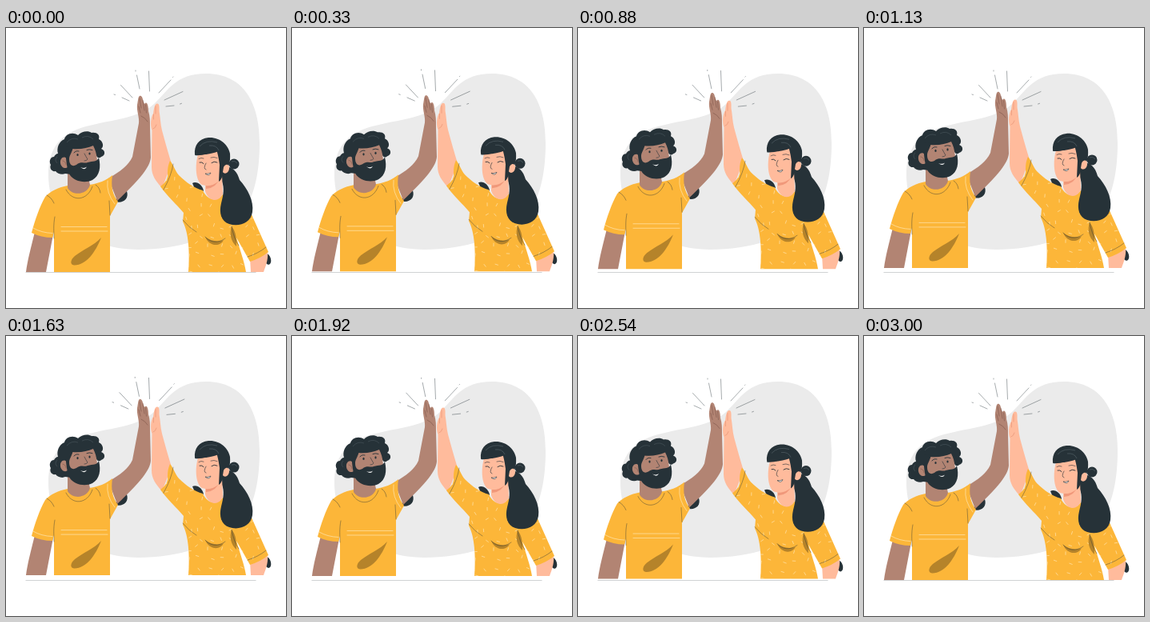
An HTML page for the animation above (3040 ms loop, 350 by 350 pixels).

```html
<!DOCTYPE html>
<html lang="en">
<head>
<meta charset="utf-8">
<title>High five</title>
<style>
  html, body { margin: 0; width: 100%; height: 100%; overflow: hidden; background: #fff; }
  svg { display: block; width: 100vw; height: 100vh; }
  .ink { fill: #263238; }
  .shirt { fill: #fcb639; }
  .tan { fill: #b28473; }
  .peach { fill: #ffbb9c; }
  .fold { fill: #b5832a; }
  .line { fill: none; stroke: #263238; stroke-width: .6; stroke-linecap: round; stroke-linejoin: round; }
  .thick { stroke-width: .9; }
  .soft { stroke-opacity: .75; stroke-width: .55; }
  .pale { fill: none; stroke: #fff0cf; stroke-width: .7; stroke-opacity: .8; stroke-linecap: round; }
  .shade { fill: none; stroke: #7f574b; stroke-width: .6; stroke-linecap: round; }
</style>
</head>
<body>
<svg viewBox="0 0 350 350">
  <defs>
    <path id="top" d="M205 166 C209 170 211 178 216 184 C225 193 235 200 246 203 C251 214 262 219 271 208 C286 211 300 219 306 231 L328 280 Q318 288 305 292 L288 262 C292 276 298 292 300 305 H228 C230 280 228 255 221 242 L222 231 C213 220 202 211 193 198 Q204 190 202 181 Q202 172 205 166Z"/>
    <clipPath id="topClip"><use href="#top"/></clipPath>
  </defs>

  <path fill="#ebebeb" d="M53 183 C53 150 68 132 100 123 C135 114 165 113 185 95 C203 78 212 57 250 57 C298 57 317 95 317 143 C317 180 311 213 292 236 C262 262 215 277 165 277 C110 276 53 250 53 183Z"/>

  <g id="rays" class="line soft">
    <path d="M143.500 71.500 L158 87 M145 87 L154 91 M135 83 L136.500 83.500 M162 53 V54 M163.500 59 L167 76 M178.500 54 L179.500 79 M208.500 61.500 L209 61 M206 65 L191 81 M221 79.500 L198 90 M200 98 L210 97 M217.500 95 L219.500 94.300"/>
  </g>

  <g id="people">
    <!-- man -->
    <path class="ink" d="M136 217 C147 220 154 213 151 204 L143 203Z"/>
    <path class="tan" d="M36 255 C31 275 27 290 25 305 H50 L59 258Z"/>
    <path class="tan" d="M128 188 C143 179 153 172 158 161 L166 119 C167 112 163 103 164 96 C165 92 165 86 167 85 C169 84 171 87 171 90 L173 95 C176 91 178 96 178 104 C180 110 180 116 180 123 L181 162 C180 173 169 188 139 216Z"/>
    <path class="shade" d="M167 88 L169 100 M171 90 L173 103 M166 98 L168 106 M174.500 96 L175.500 106 M169 110 Q174 112 177 117"/>
    <path class="shirt" d="M77 197 C66 199 55 204 49 211 C42 223 36 241 32 256 Q44 262 58 262 L60 255 V305 H130 V235 L140 217 C133 208 131 198 133 184 C126 190 115 195 103 196Z"/>
    <path class="tan" d="M77 178 L77 200 C84 211 102 208 105 196 L102 183Z"/>
    <path class="line soft" d="M75 202 C83 218 102 216 108 198 M51 209 Q57 212 60 219 M61 236 C59 247 60 254 60 263 M112 196 Q117 199 118 206 M129 216 L130 234"/>
    <path class="pale" d="M69 248.500 H126 M69 254 H127 M34 250 Q44 256 58 256.500 M127 191 Q125 206 136 220"/>
    <path class="fold" d="M119 262 C110 272 96 277 86 285 C80 290 80 296 85 296.500 C100 297 112 280 119 262Z"/>

    <path class="ink" d="M74 182 C70 184 64 182 62 179 C57 180 54 175 56 171 C53 166 56 161 60 161 C61 159 63 157 65 157 C63 150 66 142 73 139 C74 133 83 129 90 134 C94 129 103 128 107 131 C113 130 118 133 116 139 C121 141 123 148 119 151 C125 153 124 160 119 161 C116 164 113 161 112 158 L82 183Z"/>
    <path class="tan" d="M77 165 C78 160 80 156 83 151 C93 152 102 150 109 147 C114 156 116 172 112 182 C101 191 84 187 78 177Z"/>
    <path class="tan" d="M76 163 C72 159 67 163 68 169 C69 175 75 177 78 173Z"/>
    <path class="shade" d="M71 166 Q75 167 75 171"/>
    <path class="ink" d="M75 148 L84 149 C82 157 79 159 79 164 C79 171 83 174 88 171 C94 166 99 170 102 168 C109 166 113 168 116 162 C119 174 117 185 108 190 C98 195 85 191 80 184 C77 179 76 172 75 163Z"/>
    <path fill="#fff" d="M93 174 Q98 176 101 173.500 Q98.500 178.500 93 174Z"/>
    <ellipse class="ink" cx="89.500" cy="158.500" rx="1.1" ry="1.6"/>
    <ellipse class="ink" cx="104.500" cy="157" rx="1.1" ry="1.6"/>
    <path class="line thick" d="M85 156 Q87 153 91 154 M101 152.500 Q104 151 108 152.500"/>
    <path class="line" d="M98 157 Q100 161 102 164 Q101 166 98 166"/>
    <path fill="none" stroke="#55636a" stroke-width=".45" d="M76 143 Q82 136 90 139 M95 137 Q103 133 109 139 M64 161 Q60 165 64 169"/>

    <!-- woman -->
    <path class="ink" d="M233 194 C238 191 246 196 247 204 L236 201Z"/>
    <ellipse class="ink" cx="327" cy="289" rx="4" ry="7" transform="rotate(-15 327 289)"/>
    <path class="peach" d="M305 288 L327 281 C328 290 324 299 322 305 H306Z"/>
    <path class="peach" d="M195 200 C187 191 182 184 182 174 L182.500 128 C180 122 181 111 184 107 C185 100 186 94.500 189 94.500 C192 94.500 191.500 99 191.500 104 C193 112 193 120 195 128 C199 143 203 157 207 170Z"/>
    <path fill="none" stroke="#dc8468" stroke-width=".5" stroke-linecap="round" d="M187 98 L187 107 M184.500 108 L184.500 114 M184 126 Q187 125 188 121"/>
    <use class="shirt" href="#top"/>
    <g id="flecks" class="pale" clip-path="url(#topClip)"></g>
    <path class="fold" d="M249 261 C255 266 265 268 272 265 C267 275 253 272 249 261Z M282 248 C288 255 288 264 288 273 C281 267 279 257 282 248Z"/>
    <path class="line soft" d="M209 170 Q207 184 197 202 M221 240 Q229 250 238 255 M249 261 C255 268 264 270 274 263 M282 248 Q285 264 291 272 M325 274 Q315 282 302 286"/>
    <path class="ink" d="M270 173 C283 172 289 179 292 190 C302 201 310 216 308 230 C306 244 291 249 279 245 C269 242 266 231 269 219 C272 208 273 200 270 192Z"/>
    <path class="peach" d="M249 193 L249 204 C253 217 266 219 271 207 L270 183Z"/>
    <path fill="#f0987a" d="M250 197 Q261 197 267 188 Q263 200 250 201Z"/>
    <circle class="ink" cx="285" cy="170" r="6.500"/>
    <path class="ink" d="M236 158 C235 147 241 138 253 137 C267 136 278 146 280 157 C281 169 277 178 271 183 L258 160Z"/>
    <path class="peach" d="M240 158 C249 159 258 157 266 154 C272 163 272 179 269 187 C264 196 253 199 245 196 C237 191 236 172 240 158Z"/>
    <path class="ink" d="M236 159 C244 160 255 157 263 151 C265 159 266 163 267 171 L266 192 C271 189 271 181 273 178 L280 164 L272 147 L253 140 L240 147Z"/>
    <path class="peach" d="M272 174 C275 168 280 171 279 176 C278 182 273 183 271 180Z"/>
    <path fill="none" stroke="#6a777d" stroke-width=".45" d="M242 148 Q250 139 264 143 M266 153 Q263 146 254 147 M282 167 Q286 165 289 169"/>
    <path class="line thick" d="M242 168 Q245 167 247 169.500 M257 168.500 Q260 166 264 168"/>
    <path class="line" d="M241 163.500 Q244 161.500 247 163 M256 162 Q260 160.500 264 162.500 M250 169 Q246 176 250 177"/>
    <path fill="#fff" stroke="#263238" stroke-width=".6" d="M249 182 Q252 183 256 181 Q254 186 249 182Z"/>
  </g>

  <path fill="none" stroke="#c4c7c9" stroke-width=".8" d="M24.500 305.500 H312.500"/>
</svg>
<script>
  const LOOP = 3040, PULSE = 1085, LIFT = 6, GROW = .045;
  const $ = id => document.getElementById(id);
  const wave = (t, period) => (1 - Math.cos(2 * Math.PI * t / period)) / 2;

  let seed = 11;
  const rand = () => (seed = (seed * 16807) % 2147483647) / 2147483647;

  // Loose grid of short strokes for the printed blouse
  let d = '';
  for (let y = 172; y < 305; y += 12) {
    for (let x = 196; x < 330; x += 14) {
      const a = rand() * Math.PI, px = x + rand() * 8, py = y + rand() * 7;
      const dx = Math.cos(a) * 1.8, dy = Math.sin(a) * 1.8;
      d += `M${px - dx} ${py - dy}L${px + dx} ${py + dy}`;
    }
  }
  $('flecks').innerHTML = `<path d="${d}"/>`;

  function draw(t) {
    $('people').setAttribute('transform', `translate(0 ${-LIFT * wave(t, LOOP)})`);
    const s = 1 + (t < 2 * PULSE ? GROW * wave(t, PULSE) : 0);
    $('rays').setAttribute('transform', `translate(179 90) scale(${s}) translate(-179 -90)`);
  }

  const start = performance.now();
  function tick() {
    draw((performance.now() - start) % LOOP);
    requestAnimationFrame(tick);
  }
  draw(0);
  requestAnimationFrame(tick);
</script>
</body>
</html>
```
